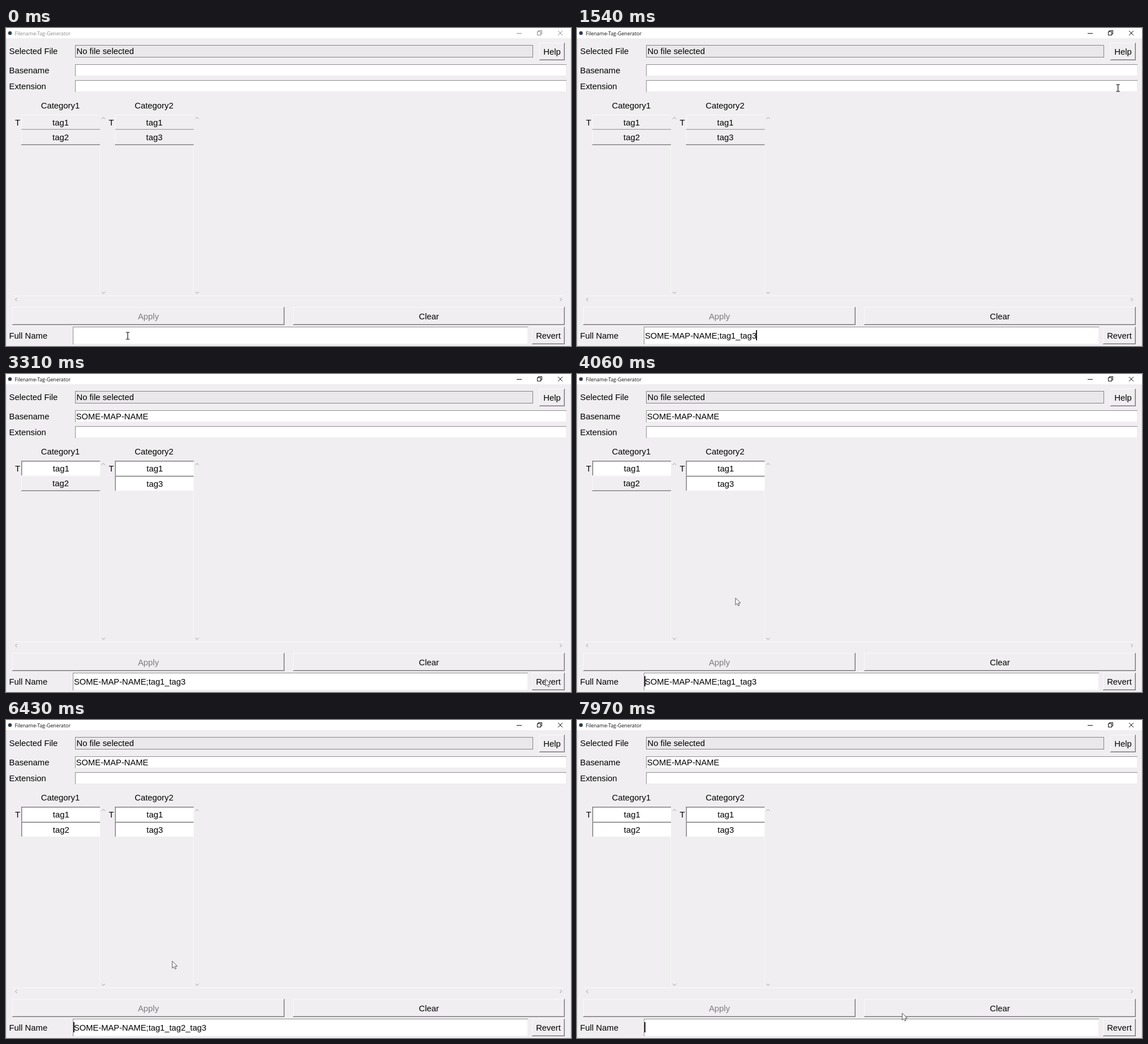
Recreate the animation shown at these times as an HTML page with a canvas. Size 998 by 561 pixels, loop 8 s.

```html
<!DOCTYPE html>
<html lang="en">
<head>
<meta charset="utf-8">
<title>Filename-Tag-Generator</title>
<style>
  html, body { margin: 0; width: 100%; height: 100%; overflow: hidden; background: #f0eef0; }
  canvas { display: block; width: 998px; height: 561px; }
</style>
</head>
<body>
<canvas id="stage" width="998" height="561"></canvas>
<script>
const ctx = document.getElementById('stage').getContext('2d');
const LOOP = 8000;
const FACE = '#f0eef0', DARK = '#777577', MID = '#b9b7b9', EDGE = '#8f8d8f', LIGHT = '#fbfafb', INK = '#000';
const FAMILY = '"Liberation Sans", Arial, sans-serif';
const UI = '14.85px ' + FAMILY, ENTRY = '14.72px ' + FAMILY;

// Moments of the user's actions
const FOCUS = 250, PASTE = 600, PRESS = 2600, REVERT = 2690,
      TOGGLE = 6030, DRAG = 6800, CUT = 7525, RELEASE = 7690;

// Pointer stops: time, x, y
const PATH = [
  [0, 215, 543], [300, 215, 543], [800, 388, 544], [1060, 388, 544],
  [1560, 958, 104], [1800, 975, 150], [2200, 942, 524], [2500, 953, 538],
  [3310, 953, 538], [4060, 280, 395], [5170, 280, 395], [5620, 76, 178],
  [5890, 82, 184], [6030, 82, 184], [6680, 397, 543], [6800, 397, 543],
  [7080, 78, 531], [7260, 8, 533], [7690, 8, 533], [7980, 576, 517], [8000, 578, 517]
];

const FIELDS = [[122, 64, 868, 21], [122, 92, 868, 21], [118, 527, 804, 31]];
const TEXT_X = 120;

function rect(x, y, w, h, color) {
  ctx.fillStyle = color;
  ctx.fillRect(x, y, w, h);
}

function line(points, color, width = 1) {
  ctx.beginPath();
  points.forEach(([x, y], i) => i ? ctx.lineTo(x, y) : ctx.moveTo(x, y));
  ctx.strokeStyle = color;
  ctx.lineWidth = width;
  ctx.stroke();
}

function text(str, x, y, color = INK, align = 'left', font = UI) {
  ctx.font = font;
  ctx.textAlign = align;
  ctx.fillStyle = color;
  ctx.fillText(str, x, y);
}

function entryText(str, x, y, color = INK) {
  text(str, x, y, color, 'left', ENTRY);
}

function widthOf(str) {
  ctx.font = ENTRY;
  return ctx.measureText(str).width;
}

function raised(x, y, w, h) {
  rect(x, y, w, h, FACE);
  rect(x, y, w, 1, LIGHT);
  rect(x, y, 1, h, LIGHT);
  rect(x + 1, y + h - 2, w - 2, 1, MID);
  rect(x + w - 2, y + 1, 1, h - 2, MID);
  rect(x, y + h - 1, w, 1, DARK);
  rect(x + w - 1, y, 1, h, DARK);
}

function sunken(x, y, w, h, fill = '#fff') {
  rect(x, y, w, h, fill);
  rect(x, y + h - 1, w, 1, '#efedef');
  rect(x + w - 1, y, 1, h, '#efedef');
  rect(x, y, w, 1, EDGE);
  rect(x, y, 1, h, EDGE);
}

function button(label, x, y, w, h, { color = INK, down = false } = {}) {
  (down ? sunken : raised)(x, y, w, h, FACE);
  const d = down ? 1 : 0;
  text(label, x + w / 2 + d, y + h / 2 + 5.5 + d, color, 'center');
}

function tag(label, x, y, on) {
  if (on) {
    rect(x, y, 139, 26, '#fff');
    rect(x, y, 139, 1.4, DARK);
    rect(x, y, 1.4, 26, DARK);
  } else {
    rect(x, y, 139, 26, FACE);
    rect(x, y, 139, 1, LIGHT);
    rect(x, y, 1, 26, LIGHT);
    rect(x, y + 25.5, 139, 1.3, DARK);
  }
  const d = on ? 0.7 : 0;
  text(label, x + 69.5 + d, y + 18.7 + d, INK, 'center');
}

function chevron(x, y, dx, dy) {
  const tip = [x + dx * 1.5, y + dy * 1.5];
  const side = s => [x - dx * 1.5 + dy * 3 * s, y - dy * 1.5 + dx * 3 * s];
  line([side(1), tip, side(-1)], '#999', 1);
}

function column(name, x, tags) {
  text(name, x + 69, 142.3, INK, 'center');
  text('T', x - 11, 172);
  rect(x + 138, 206, 1, 264, '#f8f7f8');
  tags.forEach(([label, on], i) => tag(label, x, 153 + i * 26.7, on));
  chevron(x + 145, 159, 0, -1);
  chevron(x + 145, 467, 0, 1);
}

function titleBar(active) {
  const color = active ? '#111' : '#8c8c8c';
  rect(0, 0, 998, 18, '#fff');
  ctx.beginPath();
  ctx.arc(7, 9, 3.2, 0, Math.PI * 2);
  ctx.fillStyle = '#2c3b50';
  ctx.fill();
  text('Filename-Tag-Generator', 15.5, 12.8, color, 'left', '8.8px "Open Sans", "Noto Sans", sans-serif');
  line([[902, 9.5], [911, 9.5]], color);
  ctx.strokeRect(938.5, 6.5, 6, 6);
  line([[940.5, 6], [940.5, 4.5], [946.5, 4.5], [946.5, 10.5], [945, 10.5]], color);
  line([[975, 5], [983, 13]], color);
  line([[983, 5], [975, 13]], color);
}

function pointerAt(t) {
  const i = Math.max(1, PATH.findIndex(p => t < p[0]));
  const [t0, x0, y0] = PATH[i - 1], [t1, x1, y1] = PATH[i];
  const u = (t - t0) / (t1 - t0);
  const k = u * u * (3 - 2 * u);
  return [x0 + (x1 - x0) * k, y0 + (y1 - y0) * k];
}

function caretOn(t) {
  const blink = start => (t - start) % 900 < 600;
  if (t < FOCUS) return false;
  if (t < 2650) return blink(FOCUS - 5);
  if (t < 3495) return false;
  if (t < DRAG) return blink(t < 4380 ? 3495 : 4365);
  return blink(DRAG);
}

function nameAt(t) {
  if (t < PASTE || t >= CUT) return '';
  return t < TOGGLE ? 'SOME-MAP-NAME;tag1_tag3' : 'SOME-MAP-NAME;tag1_tag2_tag3';
}

// Index of the character gap nearest to x
function gapAt(str, x) {
  let i = 0;
  while (i < str.length && TEXT_X + (widthOf(str.slice(0, i)) + widthOf(str.slice(0, i + 1))) / 2 < x) i++;
  return i;
}

function fullName(t, mouseX) {
  const name = nameAt(t);
  sunken(...FIELDS[2]);
  entryText(name, TEXT_X, 547.6);
  let gap = t < REVERT ? name.length : 0;
  if (t >= DRAG && name) {
    gap = gapAt(name, mouseX);
    const x = TEXT_X + widthOf(name.slice(0, gap));
    const end = TEXT_X + widthOf(name);
    if (end > x) {
      ctx.save();
      ctx.beginPath();
      ctx.rect(x, 533, end - x, 18);
      ctx.clip();
      rect(x, 533, end - x, 18, '#0078d7');
      entryText(name, TEXT_X, 547.6, '#fff');
      ctx.restore();
    }
  }
  if (caretOn(t)) rect(TEXT_X + widthOf(name.slice(0, gap)) - 0.9, 533, 1.7, 18, '#000');
}

function arrow(x, y) {
  const shape = [[0, 0], [0, 12.5], [2.9, 9.8], [4.8, 14], [6.8, 13.1], [4.9, 9], [8.8, 9]];
  ctx.beginPath();
  shape.forEach(([a, b]) => ctx.lineTo(x + a, y + b));
  ctx.closePath();
  ctx.fillStyle = '#fff';
  ctx.fill();
  ctx.strokeStyle = '#444';
  ctx.lineWidth = 0.9;
  ctx.stroke();
}

function iBeam(x, y) {
  line([[x, y - 5.5], [x, y + 5.5]], '#111', 1.2);
  for (const s of [-1, 1]) line([[x - 3.2, y + 6 * s], [x + 3.2, y + 6 * s]], '#111', 1.1);
}

function draw(t) {
  const [mx, my] = pointerAt(t);
  const filled = t >= REVERT;

  rect(0, 0, 998, 561, FACE);
  rect(0, 18, 1, 543, '#dcdadc');
  rect(997, 18, 1, 543, '#e2e0e2');
  titleBar(t >= FOCUS);

  text('Selected File', 5.5, 46.3);
  text('Basename', 5.5, 79.8);
  text('Extension', 5.5, 107.8);
  text('Full Name', 5.5, 547.6);

  rect(122, 30, 809, 22, '#eae8ea');
  ctx.strokeStyle = '#858385';
  ctx.lineWidth = 1;
  ctx.strokeRect(122.5, 30.5, 808, 21);
  text('No file selected', 124.5, 46.3);
  button('Help', 942, 26, 45, 31);

  sunken(...FIELDS[0]);
  sunken(...FIELDS[1]);
  if (filled) entryText('SOME-MAP-NAME', 123.8, 79.8);

  column('Category1', 27, [['tag1', filled], ['tag2', t >= TOGGLE]]);
  column('Category2', 192.5, [['tag1', filled], ['tag3', filled]]);

  rect(12, 472, 974, 1, '#fafafa');
  chevron(18, 479, -1, 0);
  chevron(980, 479, 1, 0);

  button('Apply', 11, 492, 481, 32, { color: '#7d7b7d' });
  button('Clear', 507, 492, 480, 32);
  fullName(t, mx);
  button('Revert', 929, 527, 58, 31, { down: t >= PRESS && t < REVERT });

  const overField = FIELDS.some(([x, y, w, h]) => mx >= x && mx < x + w && my >= y && my < y + h);
  const grabbed = t >= DRAG && t < RELEASE;
  (overField || grabbed ? iBeam : arrow)(mx, my);
}

const start = performance.now();
function tick() {
  draw((performance.now() - start) % LOOP);
  requestAnimationFrame(tick);
}
tick();
</script>
</body>
</html>
```
